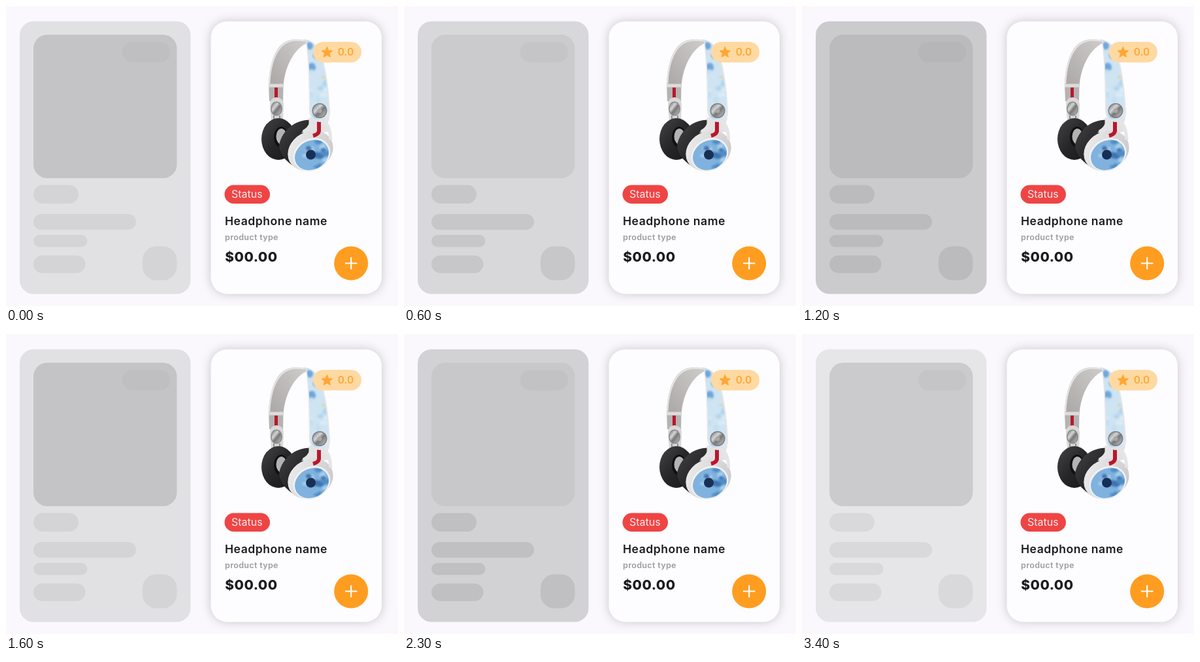
These frames come from a looping animation (600x460 px, 3.5 s). An HTML page:

```html
<!DOCTYPE html>
<html lang="en">
<head>
<meta charset="utf-8">
<title>Product card skeleton</title>
<style>
  html, body { margin: 0; width: 100%; height: 100%; overflow: hidden; background: #faf8fc; }
  svg { display: block; }
  text { font-family: Inter, sans-serif; }
  .shadow { filter: drop-shadow(0 0 8px rgba(0, 0, 0, .2)); }
</style>
</head>
<body>
<svg width="600" height="460" viewBox="0 0 600 460">
  <defs>
    <linearGradient id="inside" x1="0" y1="1" x2="1" y2="0">
      <stop offset="0" stop-color="#a9a6a4"/><stop offset="1" stop-color="#cfcdcb"/>
    </linearGradient>
    <linearGradient id="shell" x1="0" y1="0" x2="1" y2="1">
      <stop offset="0" stop-color="#f0eff0"/><stop offset="1" stop-color="#c6c4c6"/>
    </linearGradient>
    <linearGradient id="metal" x1="0" y1="0" x2="1" y2="1">
      <stop offset="0" stop-color="#777"/><stop offset=".35" stop-color="#d4d4d4"/>
      <stop offset=".55" stop-color="#777"/><stop offset="1" stop-color="#c4c4c4"/>
    </linearGradient>
    <linearGradient id="pad" x1="0" y1="0" x2="1" y2="1">
      <stop offset="0" stop-color="#434244"/><stop offset=".5" stop-color="#262527"/><stop offset="1" stop-color="#171618"/>
    </linearGradient>
    <filter id="soft" x="-50%" y="-50%" width="200%" height="200%"><feGaussianBlur stdDeviation="1.6"/></filter>
    <clipPath id="face"><path d="M456 52C470 53 479 66 484 86C490 110 493 138 494 164Q492 175 480 175Q467 174 466 160C465 122 465 84 460 54Z"/></clipPath>
    <clipPath id="disc"><ellipse cx="468" cy="228.500" rx="27" ry="22" transform="rotate(-28 468 228.500)"/></clipPath>
  </defs>

  <g id="card"><rect x="21" y="23.500" width="261.500" height="418" rx="21"/></g>
  <g id="image"><rect x="42" y="44" width="219.500" height="220" rx="21"/></g>
  <g id="badge"><rect x="178" y="55" width="73" height="31.500" rx="15.700"/></g>
  <g id="pills">
    <rect x="42" y="274.500" width="69" height="28.500" rx="14.200"/>
    <rect x="42" y="319" width="157" height="24" rx="12"/>
    <rect x="42" y="351" width="82.500" height="18.500" rx="9.200"/>
    <rect x="42" y="382.500" width="79.500" height="27" rx="13.500"/>
    <rect x="209" y="368.500" width="52.500" height="52" rx="21"/>
  </g>

  <rect class="shadow" x="313.500" y="23.500" width="261.500" height="418" rx="25" fill="#fdfcfe"/>

  <g id="headphones">
    <!-- headband -->
    <path d="M402 124C403 86 413 51 444 51L461 53V57C442 64 426 93 424.500 124Z" fill="url(#inside)"/>
    <path d="M403 122C404 86 415 53 444 52.200L460 53" fill="none" stroke="#e4e3e3" stroke-width="2.500"/>
    <path d="M402 119H424.500L424 146H403Z" fill="#b5b3b2"/>
    <path d="M402 119.500H424.500V124.500H402Z" fill="#dddcdc"/>
    <path d="M413.500 125V144" stroke="#b8192b" stroke-width="5"/>

    <!-- far cup -->
    <path d="M404 150Q405 140 414 140Q425 141 425 152L424 176H406Z" fill="#d9d8d8"/>
    <path d="M410 168V176M419 168V176" stroke="#8d8c8d" stroke-width="2"/>
    <ellipse cx="414" cy="157.500" rx="9" ry="11" fill="#8b898a"/>
    <ellipse cx="414" cy="157.500" rx="7.500" ry="9.500" fill="url(#metal)"/>
    <ellipse cx="417" cy="204" rx="26" ry="32" fill="url(#pad)"/>
    <ellipse cx="421" cy="201" rx="11" ry="16" fill="#101011"/>
    <ellipse cx="421.500" cy="200" rx="8" ry="12" fill="#b4b2b3"/>

    <!-- near cup -->
    <path d="M418 214C422 191 442 174 467 174.500Q477 176 482 184L462 250Q446 252 434 241Q419 229 418 214Z" fill="url(#pad)"/>
    <path d="M467 166L468 180Q462 187 452 194L470 197L497 192L489 183L494 167Z" fill="#e4e3e4"/>
    <ellipse cx="466" cy="222" rx="36" ry="29.500" transform="rotate(-28 466 222)" fill="url(#shell)"/>
    <path d="M466 171V181Q464 188 455 193M493 171L490 180Q496 187 497 205" fill="none" stroke="#e6e5e6" stroke-width="5"/>
    <path d="M479 177V192Q478 197 470 199" fill="none" stroke="#b9172a" stroke-width="6"/>
    <ellipse cx="468" cy="228" rx="29.500" ry="24.500" transform="rotate(-28 468 228)" fill="#f1f1f2"/>
    <g clip-path="url(#disc)">
      <rect x="436" y="196" width="64" height="64" fill="#7fb2de"/>
      <g id="discPaint" filter="url(#soft)"></g>
    </g>
    <circle cx="466.500" cy="228" r="7.500" fill="#182f55"/>

    <!-- painted side of the band -->
    <path d="M456 51C473 52 481 66 486 85C492 108 495 137 496 165Q494 178 480 178Q466 177 464 161C464 122 463 85 459 54Z" fill="#e3e5e8"/>
    <g clip-path="url(#face)">
      <rect x="440" y="48" width="60" height="132" fill="#cfe4f2"/>
      <g id="facePaint" filter="url(#soft)">
        <ellipse cx="465" cy="61" rx="5" ry="6" fill="#6fa6da"/>
        <ellipse cx="476" cy="76" rx="6" ry="5" fill="#6fa6da"/>
        <ellipse cx="468" cy="94" rx="6" ry="7" fill="#6fa6da"/>
      </g>
      <ellipse cx="486" cy="109" rx="4" ry="2.500" fill="#d8d8c8"/>
    </g>
    <circle cx="480" cy="160.500" r="11.500" fill="#7d7d80"/>
    <circle cx="480" cy="160.500" r="10" fill="url(#metal)"/>
    <circle cx="480" cy="160.500" r="3.500" fill="#a7a7a9"/>
  </g>

  <rect x="470" y="55" width="74" height="31.500" rx="15.750" fill="#ffd9a2"/>
  <path id="star" fill="#ffa733" stroke="#ffa733" stroke-linejoin="round"/>
  <text x="507.700" y="76.300" font-size="15.500" font-weight="600" fill="#ffa733">0.0</text>

  <rect x="334.500" y="274.500" width="69.500" height="28.500" rx="14.250" fill="#ef4444"/>
  <text x="345" y="294.300" font-size="16" fill="#fdecee">Status</text>
  <text x="335" y="336" font-size="17.600" font-weight="600" letter-spacing=".5" fill="#1d1c1e">Headphone name</text>
  <text x="335" y="359.300" font-size="12.600" font-weight="600" letter-spacing=".3" fill="#9d9c9e">product type</text>
  <text x="335.300" y="392" font-size="20.800" font-weight="800" letter-spacing=".5" fill="#1d1c1e">$00.00</text>

  <circle cx="528.200" cy="394.500" r="26" fill="#ff9d20"/>
  <path d="M519 394.500H537.500M528.200 385.300V403.700" stroke="#fff" stroke-width="2.200"/>
</svg>
<script>
  const LOOP = 3500, STEP = 100, PULSE = 1600;
  const $ = id => document.getElementById(id);

  // Brightness swings around mid and is highest at peak (ms).
  const tones = {
    card: { mid: 215, swing: 15.5, peak: 215 },
    image: { mid: 196.4, swing: 9.6, peak: 400 },
    badge: { mid: 191, swing: 9, peak: 400 },
    pills: { mid: 199.5, swing: 18, peak: 195 }
  };

  let seed = 7;
  const random = () => (seed = seed * 16807 % 2147483647) / 2147483647;

  // Scatters soft watercolour spots over a box.
  function paint(group, count, x, y, w, h, colors) {
    for (let i = 0; i < count; i++) {
      const spot = document.createElementNS("http://www.w3.org/2000/svg", "ellipse");
      const look = {
        cx: x + w * random(), cy: y + h * random(),
        rx: 3 + 5 * random(), ry: 2 + 4 * random(), fill: colors[i % colors.length]
      };
      for (const k in look) spot.setAttribute(k, look[k]);
      group.append(spot);
    }
  }
  paint($("discPaint"), 18, 442, 206, 52, 44, ["#a9d0ec", "#4f8cc6", "#3d73b0"]);
  paint($("facePaint"), 14, 464, 100, 30, 74, ["#dcecf5", "#b3d6ed", "#c3dff0"]);

  const points = Array.from({ length: 10 }, (_, i) => {
    const a = i * Math.PI / 5, r = i % 2 ? 4 : 8.7;
    return [491.3 + r * Math.sin(a), 71.3 - r * Math.cos(a)];
  });
  $("star").setAttribute("d", "M" + points.join("L") + "Z");

  function draw(now) {
    const t = Math.floor(now % LOOP / STEP) * STEP;
    for (const id in tones) {
      const { mid, swing, peak } = tones[id];
      const v = Math.round(mid + swing * Math.cos(2 * Math.PI * (t - peak) / PULSE));
      $(id).setAttribute("fill", `rgb(${v},${v - 1},${v + 1})`);
    }
  }

  const start = performance.now();
  function tick() {
    draw(performance.now() - start);
    requestAnimationFrame(tick);
  }
  tick();
</script>
</body>
</html>
```
